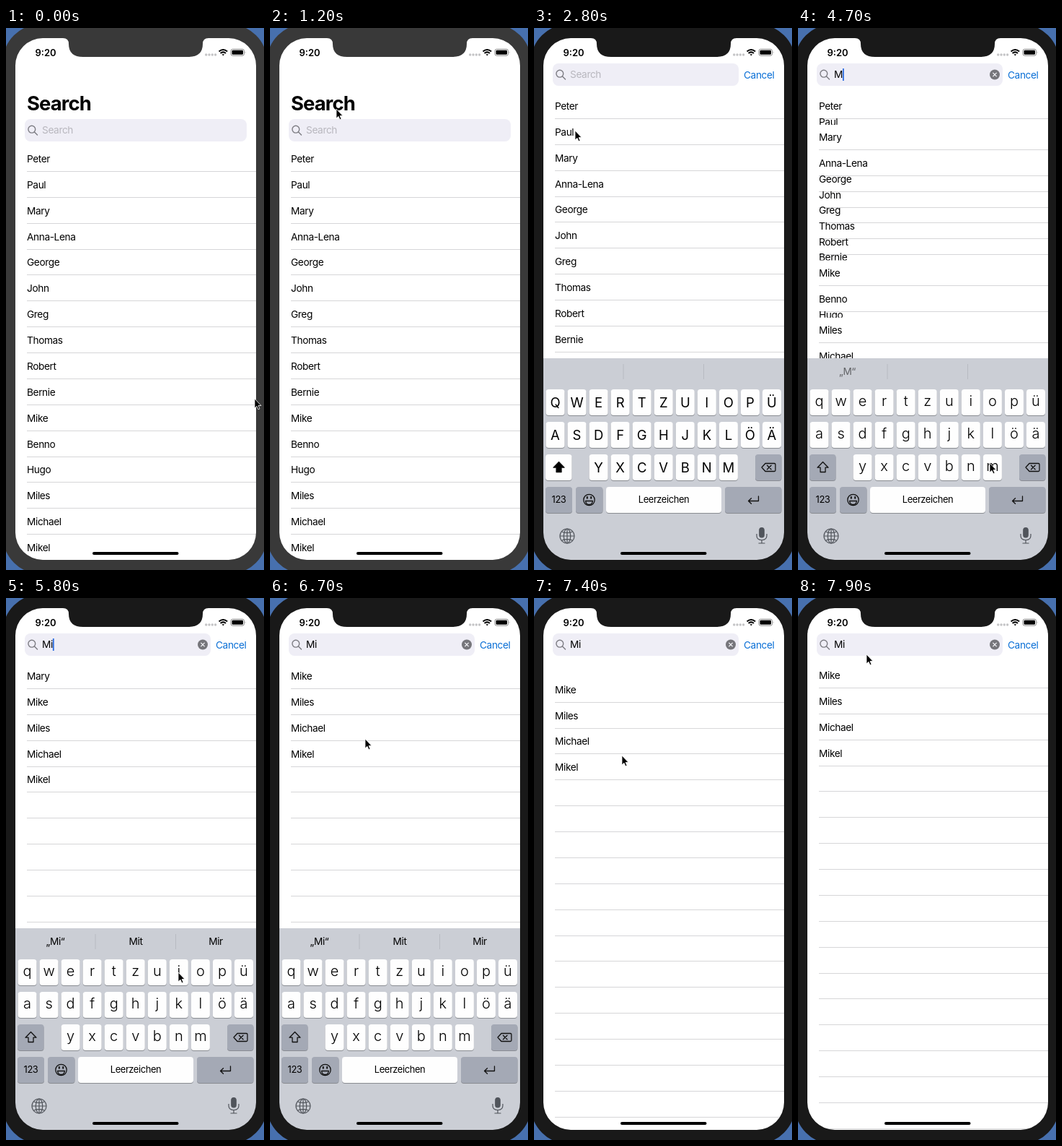
Animation, 358 px wide and 750 px high, one loop 8 s. Source, as an HTML page:

```html
<!DOCTYPE html>
<html lang="en">
<head>
<meta charset="utf-8">
<title>List search</title>
<style>
html, body { margin: 0; width: 100%; height: 100%; overflow: hidden; background: #fff; }
svg { display: block; width: 358px; height: 750px; }
text { font: 400 13.7px Inter, Roboto, sans-serif; letter-spacing: -.4px; }
.mid { text-anchor: middle; }
.sep { stroke: #d6d6d8; shape-rendering: crispEdges; }
.key { fill: #fefefe; }
.dark { fill: #a4a9b5; }
.letter { font-size: 18.5px; letter-spacing: 0; }
.lower .letter { font-size: 20px; font-weight: 300; }
.ink { fill: none; stroke: #111; stroke-width: 1.3; stroke-linejoin: round; stroke-linecap: round; }
.soft { fill: none; stroke: #50545b; stroke-width: 1.2; }
</style>
</head>
<body>
<svg viewBox="0 0 358 750">
  <rect width="358" height="750" fill="#fff"/>
  <g id="list"><g id="blank"></g></g>
  <text id="title" x="29" y="114" style="font-size:27.4px;font-weight:700;letter-spacing:-.85px">Search</text>

  <g id="bar">
    <rect id="field" x="26" y="126" height="31" rx="8" fill="#efeef6"/>
    <g fill="none" stroke="#7c7c82" stroke-width="1.4" stroke-linecap="round">
      <circle cx="35.8" cy="140.2" r="4.9"/><path d="M39.5 144l4 4"/>
    </g>
    <text id="query" x="50" y="146"></text>
    <rect id="caret" y="133" width="1.8" height="17" fill="#2a6be0"/>
    <g id="clear">
      <circle cx="273" cy="141.5" r="7" fill="#76767b"/>
      <path d="M270.4 138.9l5.2 5.2m0-5.2l-5.2 5.2" stroke="#f4f4f8" stroke-width="1.3"/>
    </g>
  </g>
  <text id="cancel" x="291" y="70" fill="#0a6fd6">Cancel</text>

  <g id="keyboard">
    <rect y="457" width="358" height="293" fill="#cbced5"/>
    <path d="M124 465v21M235.500 465v21" stroke="#b7bac1"/>
    <g id="hints"></g>
    <g id="keys"></g>
    <path id="shift" d="M34.500 600.500l-7.500 7.700h4v6.300h7v-6.300h4z" class="ink"/>
    <g class="ink">
      <path d="M321 602.500h12.500q1.500 0 1.500 1.500v8q0 1.500-1.500 1.500H321l-5-5.500z"/>
      <path d="M323.500 605.200l5.600 5.600m0-5.600l-5.600 5.600"/>
      <circle cx="76.500" cy="653" r="7.700"/>
      <path d="M71.500 654.500h10q-.8 5-5 5t-5-5z"/>
      <path d="M73.800 649v1.800M79.200 649v1.800" stroke-width="2"/>
      <path d="M311.500 648v6.500H297.500m4-3.800l-4 3.800 4 3.800"/>
    </g>
    <g class="soft">
      <circle cx="46" cy="703" r="10"/><ellipse cx="46" cy="703" rx="4.700" ry="10"/>
      <path d="M46 693v20M36 703h20M38.500 697q7.500 3.400 15 0M38.500 709q7.500-3.400 15 0"/>
      <rect x="312.800" y="691.500" width="6.400" height="13.500" rx="3.200" fill="#50545b"/>
      <path d="M309 700v2.500q0 6 7 6t7-6V700M316 708.500v4.500M311.500 713h9"/>
    </g>
  </g>

  <path fill="#4770ae" d="M0 0H358V750H0z M13 14V736H347V14z" fill-rule="evenodd"/>
  <path id="bezel" fill-rule="evenodd" d="M50-6H308a55 55 0 0 1 55 55V701a55 55 0 0 1-55 55H50a55 55 0 0 1-55-55V49A55 55 0 0 1 50-6z
    M51 14a38 38 0 0 0-38 38V698a38 38 0 0 0 38 38H309a38 38 0 0 0 38-38V52a38 38 0 0 0-38-38H281q-8 0-8 8q0 18-20 18H107q-20 0-20-18q0-8-8-8z"/>

  <text x="40.500" y="38.500" style="font-size:13px;font-weight:600;letter-spacing:0">9:20</text>
  <g fill="#c4c4c6"><circle cx="277.700" cy="37" r="1.700"/><circle cx="282" cy="37" r="1.700"/><circle cx="286.300" cy="37" r="1.700"/><circle cx="290.600" cy="37" r="1.700"/></g>
  <g fill="none" stroke="#000" stroke-width="2">
    <path d="M295.500 32.500q5.800-5 11.600 0M297.600 35q3.700-3.200 7.400 0"/><path d="M299.500 36.300h3.600l-1.800 2.200z" fill="#000" stroke="none"/>
  </g>
  <rect x="312" y="29.300" width="18.500" height="9" rx="2.500" fill="none" stroke="#8c8c8c"/>
  <rect x="313.500" y="30.800" width="15.500" height="6" rx="1.300"/>
  <path d="M331.800 32.300q1.500 1.500 0 3z" fill="#8c8c8c"/>
  <rect x="120" y="725" width="119.500" height="4" rx="2"/>
  <path id="pointer" d="M0 0V13L3 10.300 5 14.800 7 13.900 5.100 9.500H9z" stroke="#fff" stroke-width=".8"/>
</svg>
<script>
const names = ["Peter", "Paul", "Mary", "Anna-Lena", "George", "John", "Greg", "Thomas",
  "Robert", "Bernie", "Mike", "Benno", "Hugo", "Miles", "Michael", "Mikel"];
const LOOP = 8000, ROW = 35.87;
const FOCUS = 2205, TYPE_M = 4572, TYPE_I = 5800, DISMISS = 6900;
const pointerPath = [[100, 345, 513], [600, 132, 160], [900, 132, 160], [1200, 92, 112],
  [1500, 57, 142], [2800, 57, 142], [3400, 285, 635], [4100, 266, 602], [5000, 266, 602],
  [5500, 239, 518], [5950, 239, 518], [6600, 132, 195], [6800, 132, 195],
  [7100, 129, 238], [7400, 122, 218], [7900, 95, 78]];
const pullPath = [[6800, 0], [7100, 23], [7400, 18.7], [7750, -1]];

const $ = id => document.getElementById(id);
const put = (id, html) => $(id).insertAdjacentHTML("beforeend", html);
const set = (el, attr, v) => el.setAttribute(attr, v);
const shift = (el, x, y) => set(el, "transform", `translate(${x} ${y})`);
const mix = (a, b, p) => a + (b - a) * p;
const ease = (t, start, length) => {
  const p = Math.min(1, Math.max(0, (t - start) / length));
  return p * p * (3 - 2 * p);
};

// Value of an eased [time, ...values] track
function track(points, t) {
  const i = points.findIndex(k => k[0] > t);
  if (i === 0) return points[0].slice(1);
  if (i < 0) return points.at(-1).slice(1);
  const a = points[i - 1], b = points[i], p = ease(t, a[0], b[0] - a[0]);
  return a.slice(1).map((v, n) => mix(v, b[n + 1], p));
}

// Rows that survive the filter longest are stacked on top
const rank = name => name.startsWith("Mi") ? 2 : name.startsWith("M") ? 1 : 0;
const rows = names.map((name, i) => ({ name, i, rank: rank(name) }));
const place = (row, level) => rows.filter(r => r.i < row.i && r.rank >= level).length * ROW;
[...rows].sort((a, b) => a.rank - b.rank || a.i - b.i).forEach(row => {
  const back = row.rank ? `<rect x="13" y="-17.500" width="334" height="35" fill="#fff"/>` : "";
  put("list", `<g>${back}<text x="29" y="5">${row.name}</text><path class="sep" d="M29 17.500H347"/></g>`);
  row.el = $("list").lastElementChild;
});
for (let i = 1; i < 18; i++) put("blank", `<path class="sep" d="M29 ${17.5 + i * ROW}H347"/>`);

// Keyboard
function key(x, y, w, label = "", cls = "", type = "") {
  const size = type ? "" : `style="font-size:12.9px"`;
  put("keys", `<rect x="${x}" y="${y + 1}" width="${w}" height="36" rx="4" fill="#898c92"/>
    <rect class="key ${cls}" x="${x}" y="${y}" width="${w}" height="36" rx="4"/>
    <text class="mid ${type}" ${size} x="${x + w / 2}" y="${y + 22}">${label}</text>`);
}
["QWERTZUIOPÜ", "ASDFGHJKLÖÄ", "YXCVBNM"].forEach((line, r) =>
  [...line].forEach((c, i) => key(16.5 + 30.05 * (i + (r === 2 ? 2 : 0)), 500 + 45 * r, 26, c, "", "letter")));
key(16, 590, 36.5);
const shiftKey = $("keys").querySelectorAll(".key")[29];
key(307, 590, 36.5, "", "dark");
key(16, 635, 37, "123", "dark");
key(58, 635, 37.5, "", "dark");
key(100, 635, 160, "Leerzeichen");
key(265, 635, 78.5, "", "dark");
const letters = [...document.querySelectorAll(".letter")];
letters.forEach(el => { el.upper = el.textContent; el.base = +el.getAttribute("y"); });
[68.5, 180, 291].forEach(x => put("hints", `<text class="mid" x="${x}" y="480"></text>`));
const hints = [...$("hints").children];

let typed;
function setTyped(text) {
  if (text === typed) return;
  typed = text;
  $("query").textContent = text || "Search";
  set($("query"), "fill", text ? "#000" : "#b8b7be");
  set($("clear"), "opacity", text ? 1 : 0);
  set($("keys"), "class", text ? "lower" : "");
  letters.forEach(el => {
    el.textContent = text ? el.upper.toLowerCase() : el.upper;
    set(el, "y", el.base + (text ? 1 : 2.5));
  });
  set(shiftKey, "class", text ? "key dark" : "key");
  $("shift").style.fill = text ? "none" : "#000";
  const words = text ? [`„${text}“`, "Mit", "Mir"] : ["", "", ""];
  hints.forEach((el, i) => el.textContent = words[i]);
  set($("caret"), "x", text ? 50 + $("query").getComputedTextLength() : 50);
}

function draw(t) {
  const focus = ease(t, FOCUS, 290);
  const level = t < TYPE_I ? 1 : 2;
  const p = ease(t, level === 1 ? TYPE_M : TYPE_I, 300);
  const top = mix(181, 108, focus) + track(pullPath, t)[0];

  setTyped(t < TYPE_M ? "" : t < TYPE_I ? "M" : "Mi");
  let last = 0;
  for (const row of rows) {
    const gone = row.rank < level - 1 || (p === 1 && row.rank < level);
    set(row.el, "display", gone ? "none" : "inline");
    last = top + mix(place(row, level - 1), place(row, level), p);
    shift(row.el, 0, last);
  }
  shift($("blank"), 0, last);

  shift($("title"), 0, -73 * focus);
  set($("title"), "opacity", 1 - focus);
  shift($("bar"), 0, -77 * focus);
  set($("field"), "width", mix(308, 258, focus));
  set($("cancel"), "opacity", focus);
  shift($("keyboard"), 0, 293 * (1 - focus + ease(t, DISMISS, 280)));

  const since = t - (t < TYPE_M ? FOCUS : t < TYPE_I ? TYPE_M : TYPE_I);
  const blink = t > FOCUS && t < DISMISS && since % 1000 < 500;
  set($("caret"), "opacity", blink ? 1 : 0);
  hints.forEach((el, i) => set(el, "opacity", ease(t, TYPE_M + (i ? 130 : 0), 250)));

  set($("bezel"), "fill", t < 1700 ? "#393939" : "#191919");
  shift($("pointer"), ...track(pointerPath, t));
}

function tick() {
  draw(performance.now() % LOOP);
  requestAnimationFrame(tick);
}
tick();
</script>
</body>
</html>
```
